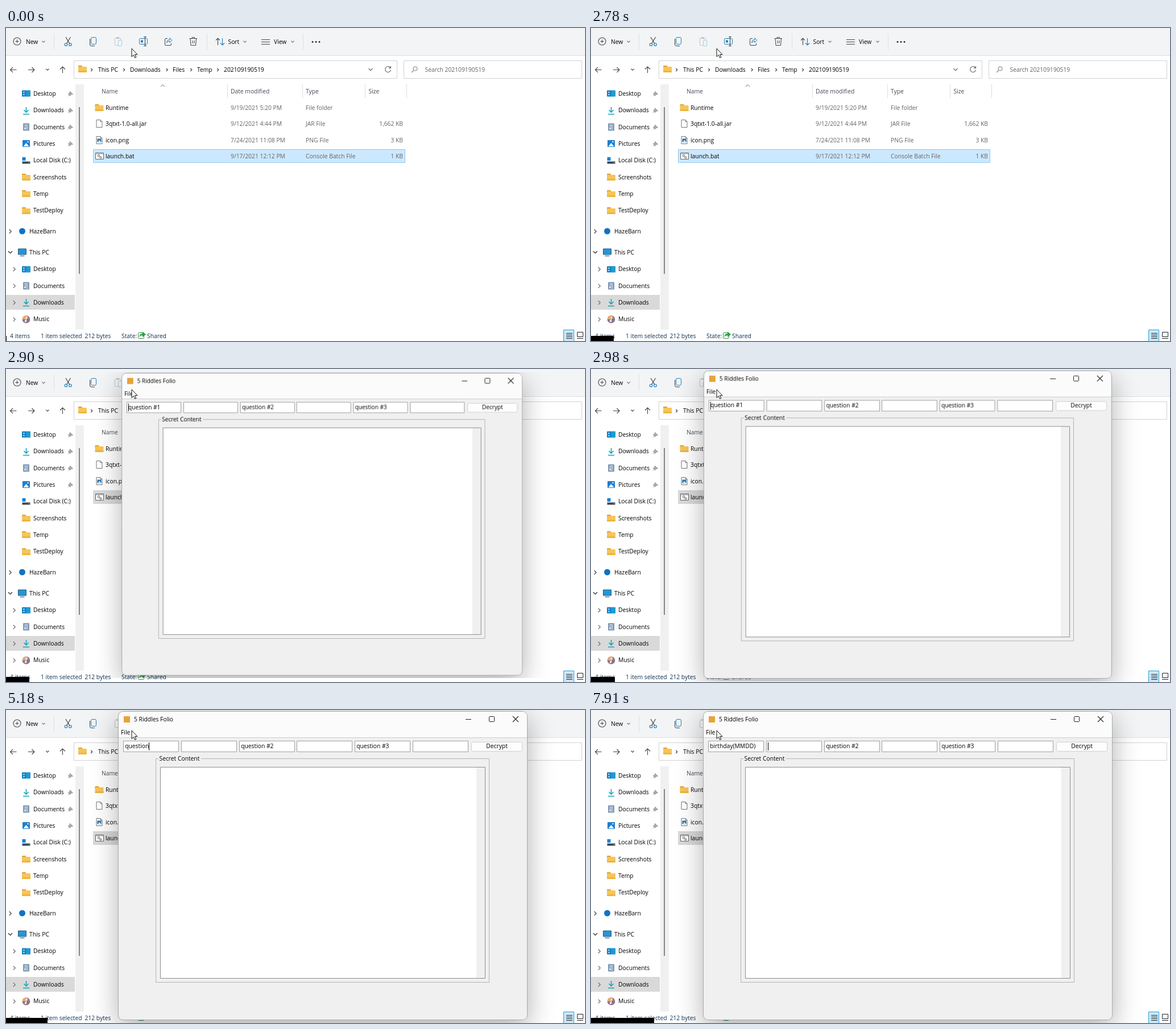
These frames come from a looping animation (1018 by 550 pixels, 7990 ms). An HTML page with a canvas:

```html
<!DOCTYPE html>
<html lang="en">
<head>
<meta charset="utf-8">
<title>File manager</title>
<style>
html, body { margin: 0; width: 100%; height: 100%; overflow: hidden; background: #fff; }
canvas { display: block; }
</style>
</head>
<body>
<canvas id="stage" width="1018" height="550"></canvas>
<script>
const W = 1018, H = 550, LOOP = 7990;
const FONT = '10.3px "Open Sans", "Noto Sans", sans-serif';
const INK = '#000', GRAY = '#636363', BLUE = '#1a78bd', DARK = '#444';
const stage = document.getElementById('stage').getContext('2d');
let g = stage;

// Drawing helpers; all draw on the current context g.
function text(s, x, cy, color = INK, align = 'left') {
  g.font = FONT;
  g.textAlign = align;
  g.fillStyle = color;
  g.fillText(s, x, Math.round(cy + 3.7));
}
function rect(x, y, w, h, fill, stroke, r = 0) {
  g.beginPath();
  g.roundRect(x, y, w, h, r);
  if (fill) { g.fillStyle = fill; g.fill(); }
  if (stroke) { g.strokeStyle = stroke; g.lineWidth = 1; g.stroke(); }
}
function path(d, color, width = 1, dx = 0, dy = 0, fill) {
  g.save();
  g.translate(dx, dy);
  const p = new Path2D(d);
  if (fill) { g.fillStyle = fill; g.fill(p); }
  if (color) { g.strokeStyle = color; g.lineWidth = width; g.stroke(p); }
  g.restore();
}
function disc(x, y, r, fill, stroke) {
  g.beginPath();
  g.arc(x, y, r, 0, 7);
  if (fill) { g.fillStyle = fill; g.fill(); }
  if (stroke) { g.strokeStyle = stroke; g.lineWidth = 1.1; g.stroke(); }
}
const chevronDown = (x, y, s = 2.5, c = '#777') => path(`M${-s} ${-s / 2}L0 ${s / 2}L${s} ${-s / 2}`, c, 1.1, x, y);
const chevronRight = (x, y, s = 2.5, c = DARK) => path(`M${-s / 2} ${-s}L${s / 2} 0L${-s / 2} ${s}`, c, 1.2, x, y);

// Icons, placed by their centre.
const icons = {
  folder(x, y) {
    rect(x - 7.5, y - 6, 7, 5, '#e3a02c', null, 1);
    rect(x - 7.5, y - 4, 15, 10, '#f6c558', null, 1);
    rect(x - 7.5, y + 3, 15, 3, '#edb443', null, 1);
  },
  desktop(x, y) {
    rect(x - 7.5, y - 5.5, 15, 11, '#1583c5', null, 1);
    rect(x - 5, y - 3, 2, 2, '#d5f3ff');
    rect(x - 5, y + 1, 2, 2, '#d5f3ff');
    rect(x, y - 5, 7, 10, '#1f9ad6');
  },
  down(x, y) { path('M0-6V3M-4-1L0 3.2L4-1M-5.5 6.5H5.5', '#15a3b8', 1.6, x, y); },
  doc(x, y) {
    rect(x - 5.5, y - 6.5, 11, 13, '#8199b4', null, 1);
    path('M-3-3.5H3M-3-1H3M0 1.5H3M0 4H3', '#eef5fc', 1, x, y);
    rect(x - 3.5, y + 1, 3, 3, '#d4e5f5');
  },
  picture(x, y) {
    rect(x - 6.5, y - 6, 13, 12, '#1d7fd0', null, 1);
    path('M-5 5L0-1L5 5Z', null, 1, x, y, '#fff');
    disc(x + 3, y - 3, 1.2, '#fff');
  },
  disk(x, y) {
    rect(x - 7, y - 6, 6, 6, '#1583d8');
    rect(x - 7, y + 1.5, 14, 4, '#3c4752');
    rect(x + 4, y + 3, 2, 1, '#4fe07b');
  },
  cloud(x, y) { disc(x, y, 5.5, '#1272c4'); },
  pc(x, y) {
    rect(x - 7, y - 6, 14, 10, '#2396d8', '#2a5878');
    path('M-4 6.5H4', '#56707f', 1.4, x, y);
  },
  music(x, y) {
    disc(x, y, 6.8, '#8d7488');
    path('M-6.8 0A6.8 6.8 0 0 1 3-6L0 0Z', null, 1, x, y, '#e6a870');
    path('M0 3V-4L3-2', '#fff', 1.2, x, y);
    disc(x - 1, y + 3, 1.7, '#fff');
  },
  file(x, y) { path('M-5-6.5H2L5-3.5V6.5H-5ZM2-6.5V-3.5H5', '#757575', 1, x, y, '#fff'); },
  image(x, y) {
    icons.file(x, y);
    rect(x - 3.5, y - 2.5, 7, 6, '#2277b5');
    path('M-2 3L0 0L3 3Z', null, 1, x, y, '#fff');
  },
  batch(x, y) {
    rect(x - 6.5, y - 5.5, 14, 11, '#fff', '#666');
    path('M-6-4H7', '#8a949c', 1, x, y);
    disc(x - 1, y - .5, 1.7, null, '#777');
    disc(x + 2.5, y + 2.5, 1.5, null, '#777');
  }
};

function drawToolbar() {
  rect(0, 0, W, 48, '#f2f4f5');
  rect(0, 48, W, 1, '#dedfe0');
  disc(19.5, 23.5, 6.5, null, DARK);
  path('M16.5 23.5H22.5M19.5 20.5V26.5', DARK);
  text('New', 35, 24.5);
  for (const x of [84, 353, 522]) rect(x, 10, 1, 28, '#dfe0e1');
  for (const x of [66, 420, 504]) chevronDown(x, 24);
  path('M105 16L112 27.5M113.5 16L106.5 27.5', DARK, 1.2);
  disc(105.5, 29, 2.3, null, BLUE);
  disc(113, 29, 2.3, null, BLUE);
  rect(149.5, 16.5, 9, 12, null, BLUE, 2);
  path('M147.5 19V29Q147.5 31.5 150 31.5H156', DARK);
  rect(191.5, 17.5, 10, 13, null, '#c2c6ca', 1);
  rect(194, 16, 5, 3, '#c2c6ca');
  rect(197.5, 21.5, 6, 10, '#f2f4f5', '#a5cbe5', 1);
  rect(234.5, 18.5, 14, 10, null, BLUE, 2);
  rect(237, 21.5, 4, 4, '#397fae');
  path('M244.5 16V31M242 15.5H247M242 31.5H247', DARK, 1.1);
  path('M284 18.5H281Q279.5 18.5 279.5 20V29Q279.5 30.5 281 30.5H289Q290.5 30.5 290.5 29V27', DARK);
  path('M282.5 26Q283 20.5 288 20.5V17.5L292 21.5L288 25.5V23Q284.5 23 282.5 26Z', BLUE);
  path('M322.5 18.5H336M327 18V16.5H331.5V18M324 19L325 30.5H333.5L334.5 19M328 22V27M331 22V27', DARK);
  path('M372.5 30V18M369 21.5L372.5 18L376 21.5', DARK, 1.1);
  path('M380.5 18V30M377 26.5L380.5 30L384 26.5', BLUE, 1.1);
  text('Sort', 390.5, 24.5);
  path('M449 20.5H464M449 24.5H464M449 28.5H464', DARK);
  text('View', 471, 24.5);
  for (const x of [539, 545, 551]) disc(x, 24.5, 1.4, '#222');
}

function drawAddress() {
  path('M18.5 73.5H7.5M12 69L7.5 73.5L12 78', DARK, 1.1);
  path('M39 73.5H50M45.5 69L50 73.5L45.5 78', DARK, 1.1);
  chevronDown(73, 73, 2.5, DARK);
  path('M99.5 79V68M95 72.5L99.5 68L104 72.5', DARK, 1.1);
  rect(119.5, 57.5, 568, 31, '#fff', '#d2d2d2');
  rect(699.5, 57.5, 313, 31, '#fff', '#d2d2d2');
  icons.folder(134.5, 72);
  for (const x of [150.5, 207.5, 283, 325.5, 372.5]) chevronRight(x, 73.5);
  const crumbs = { 'This PC': 162, Downloads: 218, Files: 293, Temp: 336, '202109190519': 383 };
  for (const name in crumbs) text(name, crumbs[name], 73);
  chevronDown(641, 73, 3.5, '#666');
  path('M676 70A5 5 0 1 0 676.5 74M676.5 67V70.5H673', '#666', 1.1);
  disc(719.5, 71.5, 3.5, null, '#888');
  path('M717 74.5L713 78', '#888', 1.1);
  text('Search 202109190519', 736.5, 73, GRAY);
}

function drawSidebar() {
  rect(0, 469, 121, 26, '#d9d9d9');
  rect(122, 99, 15, 431, '#f0f0f0');
  rect(128, 139, 2, 293, '#858585');
  const quick = [['Desktop', 'desktop'], ['Downloads', 'down'], ['Documents', 'doc'], ['Pictures', 'picture'],
    ['Local Disk (C:)', 'disk'], ['Screenshots', 'folder'], ['Temp', 'folder'], ['TestDeploy', 'folder']];
  quick.forEach(([name, icon], i) => {
    const y = 115.3 + i * 29.35;
    icons[icon](35.5, Math.round(y));
    text(name, 48, y);
    if (i < 4) path('M-1-4L4 1L1 1.5L-1 4L-4 0L-1.5-1ZM-2 2L-4.5 4.5', '#9a9a9a', 1, 113.5, y, '#a9a9a9');
  });
  icons.cloud(28.5, 357);
  text('HazeBarn', 41, 357.3);
  chevronRight(7.5, 357.5, 3.5);
  icons.pc(28.5, 394);
  text('This PC', 41, 394);
  chevronDown(7.5, 394, 3.5, '#222');
  [['Desktop', 'desktop'], ['Documents', 'doc'], ['Downloads', 'down'], ['Music', 'music']].forEach(([name, icon], i) => {
    const y = 423.5 + i * 29.35;
    icons[icon](35.5, Math.round(y));
    text(name, 48, y);
    chevronRight(14.5, y + .5, 3.5, '#666');
  });
}

function drawFiles(focused) {
  for (const x of [389, 521, 631, 704]) rect(x, 99, 1, 24, '#dedede');
  path('M272 103L275.5 99.5L279 103', '#666');
  const heads = { Name: 168, 'Date modified': 395, Type: 527, Size: 637.5 };
  for (const name in heads) text(name, heads[name], 111, '#434a56');
  if (focused) rect(153.5, 213.5, 548, 23, '#cce8ff', '#8fcbf5');
  else rect(153, 213, 549, 24, '#d9d9d9');
  const files = [
    ['folder', 'Runtime', '9/19/2021 5:20 PM', 'File folder', ''],
    ['file', '3qtxt-1.0-all.jar', '9/12/2021 4:44 PM', 'JAR File', '1,662 KB'],
    ['image', 'icon.png', '7/24/2021 11:08 PM', 'PNG File', '3 KB'],
    ['batch', 'launch.bat', '9/17/2021 12:12 PM', 'Console Batch File', '1 KB']
  ];
  files.forEach(([icon, name, date, type, size], i) => {
    const y = 140 + i * 28.5;
    icons[icon](164, Math.round(y - .5));
    text(name, 175, y);
    text(date, 395, y, GRAY);
    text(type, 527, y, GRAY);
    text(size, 698, y, GRAY, 'right');
  });
}

function drawStatus() {
  const parts = { '4 items': 7, '1 item selected': 61, '212 bytes': 138.5, 'State:': 203, Shared: 248 };
  for (const s in parts) text(s, parts[s], 541, '#0d3055');
  rect(232.5, 535.5, 10, 10, '#fff', '#3a8f4d', 1);
  path('M234 543Q235 537 240 537V533.5L246 538.5L240 543V540Q237 540 234 543Z', null, 1, 0, 0, '#27a243');
  rect(980.5, 530.5, 18, 20, '#cbe8f7', '#2a9fd6');
  path('M985 536.5H996M985 539.5H996M985 542.5H996M985 545.5H996', '#222');
  rect(1004.5, 534.5, 10, 8, '#fff', '#222');
  path('M1004 545.5H1015', '#222');
}

function drawDialog() {
  g.shadowColor = 'rgba(0,0,0,.32)';
  g.shadowBlur = 48;
  g.shadowOffsetY = 14;
  rect(198, 2, 719, 543, '#f0f0f0', null, 8);
  g.shadowColor = 'transparent';
  rect(198, 2, 719, 46, '#fbfbfb', null, [8, 8, 0, 0]);
  rect(198, 48, 719, 1, '#cfcfcf');
  rect(197.5, 2.5, 719, 542, null, '#a9a9a9', 8);
  rect(207, 11, 11, 11, '#e8a33a');
  text('5 Riddles Folio', 225, 16.5);
  path('M808 16.5H818M891 11L901 21M901 11L891 21', '#222', 1.1);
  rect(849.5, 11.5, 9, 9, null, '#222', 1);
  text('File', 202, 39.5);
  for (let i = 0; i < 6; i++) {
    const x = Math.round(206 + i * 101.75) + .5;
    rect(x, 54.5, 97, 19, '#fff', '#a0a0a0');
    if (i === 2 || i === 4) text('question #' + (i / 2 + 1), x + 2.7, 63.2);
  }
  rect(818.5, 56.5, 89, 16, '#fdfdfd', '#d0d0d0', 3);
  text('Decrypt', 863, 63.2, INK, 'center');
  path('M268 85.5H263.5V478.5H849.5V85.5H343', '#b4b4b4');
  text('Secret Content', 269.5, 85.5);
  rect(271.5, 100.5, 571, 371, '#fff', '#8a8d92');
  rect(827, 101, 15, 370, '#f0f0f0');
}

function layer(draw) {
  const canvas = document.createElement('canvas');
  canvas.width = W;
  canvas.height = H;
  g = canvas.getContext('2d');
  draw();
  g = stage;
  return canvas;
}
const desktop = focused => layer(() => {
  rect(0, 0, W, H, '#fff');
  drawToolbar();
  drawAddress();
  drawSidebar();
  drawFiles(focused);
  drawStatus();
});
const active = desktop(true), inactive = desktop(false), dialog = layer(drawDialog);

// Editing of the first field: [time, text, caret index, caret x offset of field]
const edits = [[2790, 'question #1', 0, 0], [4600, 'question #1', 11, 0]];
const type = (start, step, count, textAt) => {
  for (let i = 1; i <= count; i++) {
    const s = textAt(i);
    edits.push([start + (i - 1) * step, s, s.length, 0]);
  }
};
const label = 'birthday(MMDD)';
type(5100, 40, 11, i => 'question #1'.slice(0, 11 - i));
type(5700, 75, 8, i => label.slice(0, i));
type(6580, 0, 1, () => label.slice(0, 9));
type(6800, 130, 5, i => label.slice(0, 9 + i));
edits.push([7600, label, 0, 102]);

function drawField(t) {
  const [since, value, index, offset] = edits.findLast(e => e[0] <= t);
  text(value, 209.2, 63.2);
  if ((t - since) % 1000 < 500) {
    const x = 209 + offset + g.measureText(value.slice(0, index)).width;
    rect(Math.round(x), 57, 1, 14, '#000');
  }
}

const OPEN = 2788;
function render(t) {
  g.drawImage(t < 2900 ? active : inactive, 0, 0);
  if (t > OPEN + 2) {
    const rest = Math.max(0, 1 - (t - OPEN) / 278), scale = 1 - .1 * rest ** 3;
    g.save();
    g.globalAlpha = Math.min(1, (t - OPEN) / 62);
    g.translate(492, 237);
    g.scale(scale, scale);
    g.translate(-492, -237);
    g.drawImage(dialog, 0, 0);
    drawField(t);
    g.restore();
  }
  path('M.5 0V14.5L3.8 11.4L6 16.4L8.3 15.4L6.1 10.6H10.5Z', '#111', 1, 220.5, 36, '#fff');
  rect(0, 541, Math.round(1 + t * .0139), 9, '#000');
}

function frame() {
  render(performance.now() % LOOP);
  requestAnimationFrame(frame);
}
frame();
</script>
</body>
</html>
```
